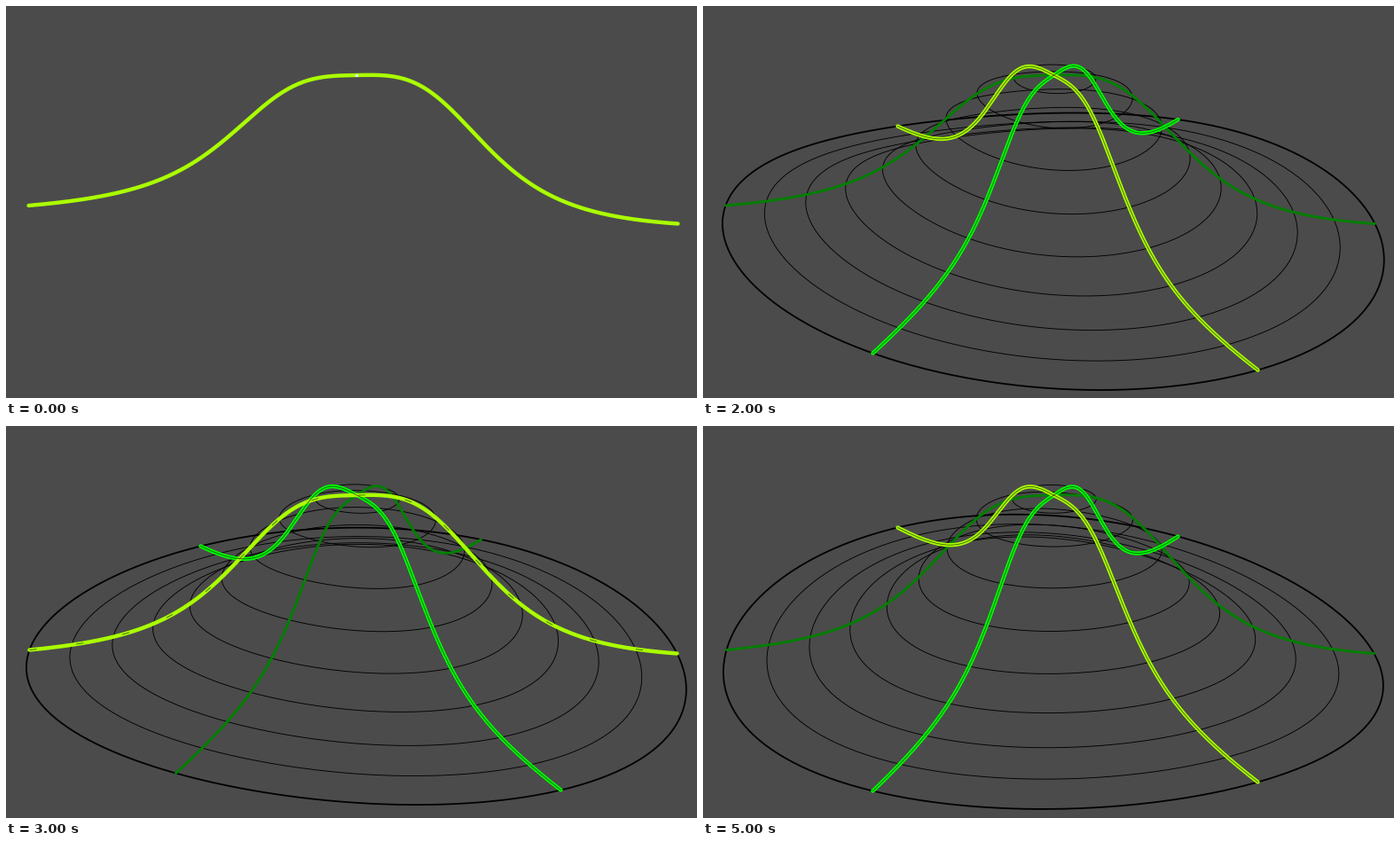
These frames come from a looping animation (779 by 442 pixels, 6 s). A matplotlib script:

```python
import numpy as np
import matplotlib.pyplot as plt
from matplotlib.animation import FuncAnimation

W, H, DPI = 779, 442, 64
PX = 72 / DPI                        # one pixel in points
PEAK = np.array([395, 77.5])
TILT, RISE, PERSP = 0.34, 0.94, 0.0005   # camera
POWER = 3.3                          # steepness of the hill
RINGS = 9
COLORS = ["#aaff00", "#00ff00", "#008000"]   # newest to oldest
WIDTHS = [4.4, 4.4, 2.9]

# each sketch: (end x, end y, radius at half height) for both sides
SKETCHES = [
    [(25, 224.5, 153), (757, 245, 157)],
    [(191, 391, 148), (535, 127.5, 150)],
    [(625, 410, 143), (219, 135, 157)],
    [(26, 252, 150), (756, 256, 156)],
    [(191, 411, 152), (535, 124, 140)],
    [(625, 401, 147), (219, 114, 146)],
]


def side(sector, x, y, half):
    """Screen path of one slope and its points at equal lengths."""
    a = np.radians(60 * sector - 3)
    c, s = np.cos(a), np.sin(a)
    dx, dy = np.array([x, y]) - PEAK
    reach = dx / (c + PERSP * s * dx)
    drop = (dy * (1 - PERSP * s * reach) - TILT * s * reach) / RISE

    r = np.linspace(0, reach, 200)
    fall = r**POWER / (r**POWER + half**POWER)
    fall *= drop / fall[-1]
    w = 1 - PERSP * s * r
    path = PEAK + np.column_stack([c * r / w, (TILT * s * r + RISE * fall) / w])

    length = np.r_[0, np.cumsum(np.hypot(np.diff(r), np.diff(fall)))]
    at = np.linspace(0, length[-1], RINGS + 1)
    marks = np.column_stack([np.interp(at, length, v) for v in path.T])
    return path, marks


def loop(pts, n=360):
    """Closed trigonometric curve through six points."""
    coef = np.fft.fft(pts @ [1, 1j]) / 6
    a = np.linspace(0, 2 * np.pi, n)
    z = coef[3] * np.cos(3 * a)
    for k in range(-2, 3):
        z = z + coef[k] * np.exp(1j * k * a)
    return z.real, z.imag


def build(i):
    """Whole stroke of a sketch, and ring marks by sector."""
    near = 3 - i % 3
    sectors = near, (near + 3) % 6
    (p, m), (q, k) = [side(d, *end) for d, end in zip(sectors, SKETCHES[i])]
    return np.vstack([p[::-1], q[1:]]), dict(zip(sectors, (m, k)))


profiles = [build(i) for i in range(len(SKETCHES))]

fig = plt.figure(figsize=(W / DPI, H / DPI), dpi=DPI, facecolor="#4b4b4b")
ax = fig.add_axes([0, 0, 1, 1])
ax.set_xlim(-0.5, W - 0.5)
ax.set_ylim(H - 0.5, -0.5)
ax.axis("off")


def add_line(color, width, z, **kw):
    return ax.plot([], [], color=color, lw=width * PX, zorder=z, **kw)[0]


strokes = [add_line(c, w, 5 - i, solid_capstyle="round")
           for i, (c, w) in enumerate(zip(COLORS, WIDTHS))]
cores = [add_line("black", 0.9, 6, alpha=0.6) for _ in range(2)]
rings = [add_line("black", 1.8 if k == RINGS else 0.9, 1)
         for k in range(1, RINGS + 1)]
gap, = ax.plot(*PEAK, "s", color="#e8eeff", ms=3 * PX, mew=0, zorder=8)
lines = strokes + cores + rings


def draw(step):
    shown = list(range(step, max(-1, step - 3), -1))
    full = len(shown) == 3
    for line in lines:
        line.set_data([], [])
    for stroke, i in zip(strokes, shown):
        stroke.set_data(*profiles[i][0].T)
    if full:
        for core, i in zip(cores, shown):
            core.set_data(*profiles[i][0].T)
            core.set_linestyle("-" if i % 3 else (0, (9, 50)))
        marks = {}
        for i in shown:
            marks.update(profiles[i][1])
        for k, ring in enumerate(rings, 1):
            ring.set_data(*loop(np.array([marks[d][k] for d in range(6)])))
    gap.set_visible(not full)
    return lines + [gap]


anim = FuncAnimation(fig, draw, frames=len(SKETCHES), interval=1000,
                     repeat=True, repeat_delay=0, blit=False)
plt.show()
```
